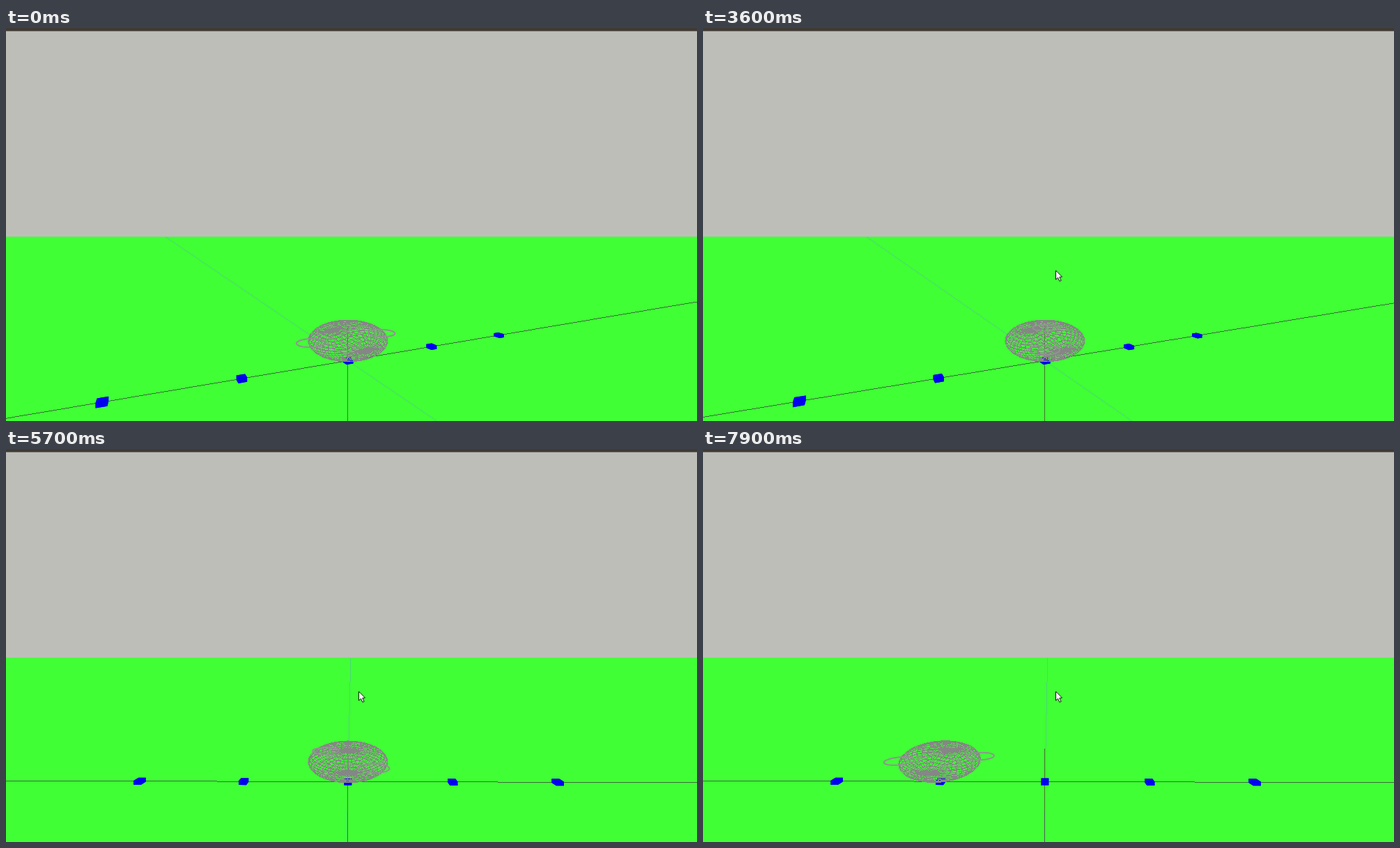
An HTML page with a canvas for the animation above (8 s loop, 992 by 564 pixels).

```html
<!DOCTYPE html>
<html lang="en">
<head>
<meta charset="utf-8">
<title>Wireframe robot</title>
<style>
  html, body { margin: 0; width: 100%; height: 100%; overflow: hidden; background: #bebeb9; }
  canvas { display: block; width: 992px; height: 564px; }
</style>
</head>
<body>
<canvas id="stage" width="992" height="564"></canvas>
<script>
const ctx = document.getElementById('stage').getContext('2d');
const W = 992, H = 564, LOOP = 8000, STEP = 100;

// Camera orbits the origin; one world unit is the spacing between cubes.
const FOCAL = 560, DIST = 3.733, EYE = 1.263, FAR = 59;
const CENTER_X = 490.9, HORIZON = 288, GROUND_TOP = 299.5;

const BODY = { radius: 0.378, height: 0.167, y: 0.201, slices: 36, stacks: 20 };
const RING = { orbit: 0.375, radius: 0.134, y: 0.22 };
const CUBE = { x: 0.036, y: 0.019, z: 0.042 };

// Keyframes: [time, value...]
const YAW = [[3199, 26.5], [3200, 26], [3700, 26], [4400, 15.7], [5480, -0.42]];
const SPIN = [[1580, 0], [2100, 16.4], [5700, 128.3], [6600, 150], [7900, 193]];
const POINTER = [[1400, 79, 296], [2100, 344, 354], [2200, 350, 353], [2700, 440, 318], [3100, 506, 348]];
const JUMP_TIME = 7200;

const rad = deg => deg * Math.PI / 180;

function sample(track, t) {
  if (t <= track[0][0]) return track[0].slice(1);
  const next = track.findIndex(k => k[0] > t);
  if (next < 0) return track[track.length - 1].slice(1);
  const a = track[next - 1], b = track[next];
  const u = (t - a[0]) / (b[0] - a[0]);
  return a.slice(1).map((v, i) => v + (b[i + 1] - v) * u);
}

let cosYaw = 1, sinYaw = 0;

function project(x, y, z) {
  const scale = FOCAL / (DIST + x * sinYaw + z * cosYaw);
  return [CENTER_X + (x * cosYaw - z * sinYaw) * scale, HORIZON + (EYE - y) * scale];
}

// Hard-edged one-pixel line, sampled at pixel centres along its longer axis
function line(a, b) {
  const major = Math.abs(b[0] - a[0]) > Math.abs(b[1] - a[1]) ? 0 : 1, minor = 1 - major;
  if (a[major] > b[major]) [a, b] = [b, a];
  const slope = (b[minor] - a[minor]) / (b[major] - a[major]);
  for (let i = Math.ceil(a[major] - 0.5); i + 0.5 < b[major]; i++) {
    const j = Math.floor(a[minor] + (i + 0.5 - a[major]) * slope);
    const [x, y] = major ? [j, i] : [i, j];
    if (x >= 0 && x < W && y >= GROUND_TOP && y < H) ctx.fillRect(x, y, 1, 1);
  }
}

function trace(points) {
  ctx.beginPath();
  points.forEach(p => ctx.lineTo(...p));
  ctx.closePath();
}

function drawAxes() {
  ctx.fillStyle = '#4cd67a';
  line(project(0, 0, -2.4), project(0, 0, (FAR - DIST) / cosYaw));
  ctx.fillStyle = '#3c6a3c';
  line(project(-7, 0, 0), project(9, 0, 0));
  ctx.fillStyle = '#46742c';
  line(project(0, 0.315, 0), project(0, -0.6, 0));
}

function drawCube(cx) {
  const corner = i => project(
    cx + (i & 1 ? CUBE.x : -CUBE.x), i & 2 ? CUBE.y : -CUBE.y, i & 4 ? CUBE.z : -CUBE.z);
  const faces = ['0132', '4576', '0154', '2376', '0264', '1375'];
  ctx.fillStyle = '#0202ee';
  for (const face of faces) {
    trace([...face].map(i => corner(+i)));
    ctx.fill();
  }
}

function drawBody(cx) {
  const { radius, height, y, slices, stacks } = BODY;
  const vertex = (i, j) => {
    const lat = Math.PI * j / stacks, lon = 2 * Math.PI * i / slices;
    const s = Math.sin(lat);
    return project(cx + radius * s * Math.cos(lon), y + height * s * Math.sin(lon), radius * Math.cos(lat));
  };
  ctx.fillStyle = '#868686';
  for (let i = 0; i < slices; i++) {
    for (let j = 0; j < stacks; j++) {
      const p = vertex(i, j);
      line(p, vertex(i, j + 1));
      if (j) line(p, vertex(i + 1, j));
    }
  }
}

function drawRing(cx, angle) {
  const x = cx - RING.orbit * Math.cos(angle), z = -RING.orbit * Math.sin(angle);
  trace(Array.from({ length: 40 }, (_, i) => {
    const a = 2 * Math.PI * i / 40;
    return project(x + RING.radius * Math.cos(a), RING.y, z + RING.radius * Math.sin(a));
  }));
  ctx.strokeStyle = '#929292';
  ctx.lineWidth = 2;
  ctx.stroke();
}

function drawPointer(x, y) {
  const shape = [[0, 0], [0, 13], [3, 10.2], [5.4, 15.4], [7.6, 14.4], [5.3, 9.4], [9, 9.1]];
  trace(shape.map(([px, py]) => [Math.round(x) + 0.5 + px, Math.round(y) + px * 0 + py]));
  ctx.fillStyle = '#fff';
  ctx.fill();
  ctx.strokeStyle = '#111';
  ctx.lineWidth = 1;
  ctx.stroke();
}

function draw(t) {
  const yaw = rad(sample(YAW, t)[0]);
  cosYaw = Math.cos(yaw);
  sinYaw = Math.sin(yaw);

  ctx.fillStyle = '#bebeb9';
  ctx.fillRect(0, 0, W, H);
  ctx.fillStyle = '#3f3b34';
  ctx.fillRect(0, 0, W, 4.5);
  ctx.fillStyle = '#40ff35';
  ctx.fillRect(0, GROUND_TOP, W, H - GROUND_TOP);

  drawAxes();
  for (let k = -2; k <= 2; k++) drawCube(k);

  const robotX = t < JUMP_TIME ? 0 : -1;
  const spin = rad(sample(SPIN, t)[0]);
  drawBody(robotX);
  drawRing(robotX, spin);
  drawRing(robotX, spin + Math.PI);

  if (t >= POINTER[0][0]) drawPointer(...sample(POINTER, t));
}

const start = performance.now();
let shown = -1;

function tick() {
  const t = Math.floor((performance.now() - start) % LOOP / STEP) * STEP;
  if (t !== shown) draw(shown = t);
  requestAnimationFrame(tick);
}
tick();
</script>
</body>
</html>
```
